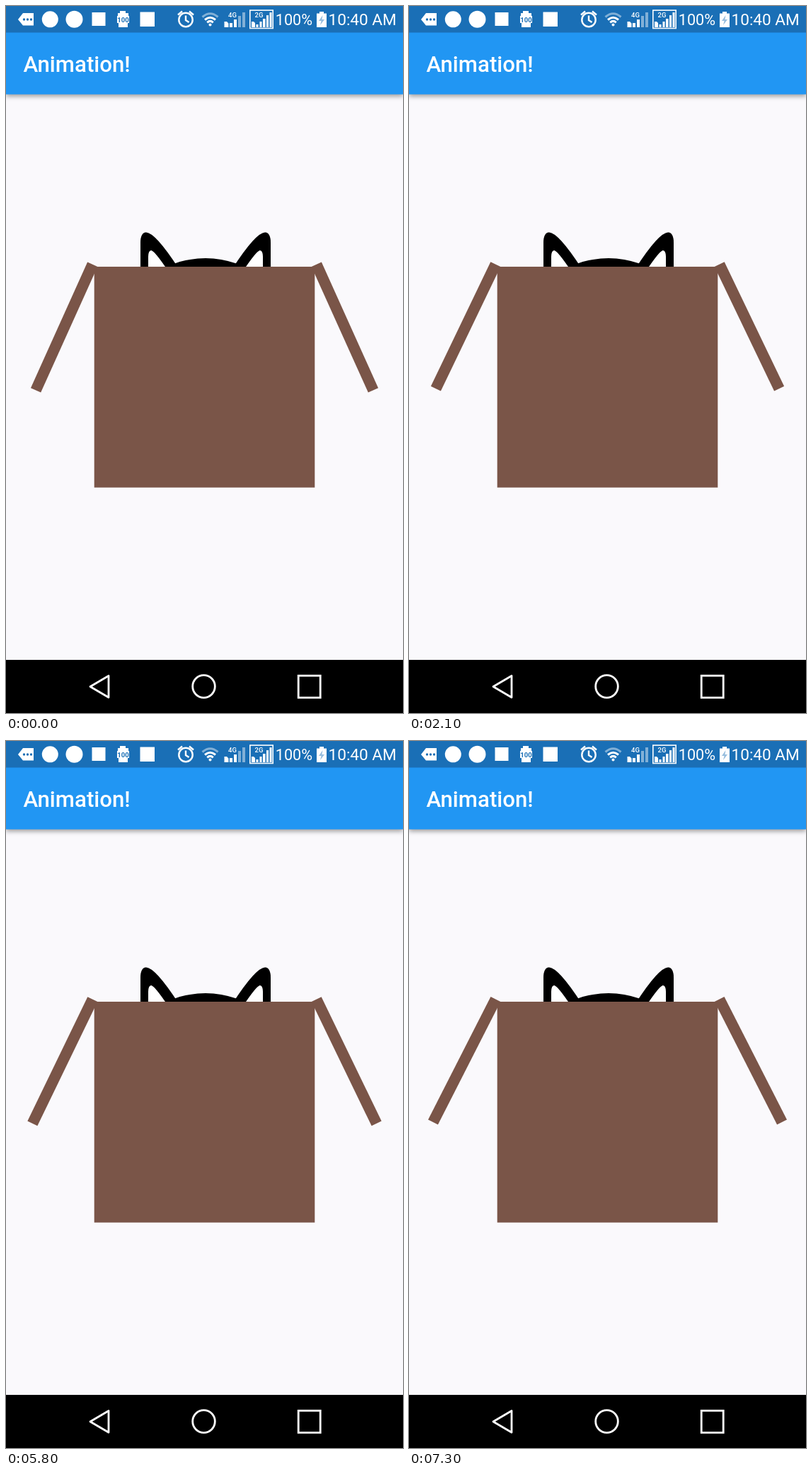
Recreate the animation shown at these times as an HTML page. Size 561 px wide and 998 px high, loop 7400 ms.

```html
<!DOCTYPE html>
<html lang="en">
<head>
<meta charset="utf-8">
<title>Animation!</title>
<style>
  html, body { margin: 0; width: 100%; height: 100%; overflow: hidden; background: #faf9fc; }
  svg { display: block; width: 100%; height: 100%; }
  text { font-family: Roboto, "Noto Sans", sans-serif; fill: #fff; }
  .bar { fill: #2196f3; filter: drop-shadow(0 3px 3px rgba(0, 0, 0, .36)); }
  .wood { fill: #7a5548; }
  .dim { opacity: .45; }
  .line { fill: none; stroke: #fff; }
  .blue { fill: #1a6fb6; }
</style>
</head>
<body>
<svg viewBox="0 0 561 998" preserveAspectRatio="none">
  <defs>
    <g id="side">
      <path d="M190 326V264Q190 250 198 249.5Q211 250 243 299L230 326Z"/>
      <path d="M201 322V284Q201 275 205.5 275Q211 277 229 304V322Z" fill="#fff"/>
      <path d="M147 332L178 344M136 348L176 352.5M140 366L172 362"
        stroke="#000" stroke-width="5" stroke-linecap="round"/>
    </g>
    <rect id="flap" class="wood" width="194.8" height="15.58"/>
  </defs>

  <rect width="561" height="998" fill="#faf9fc"/>

  <g id="cat">
    <use href="#side"/>
    <use href="#side" transform="translate(564) scale(-1 1)"/>
    <ellipse cx="282" cy="384" rx="114" ry="98"/>
    <g fill="#fff">
      <circle cx="245.5" cy="342.3" r="24.7"/>
      <circle cx="317.5" cy="342.3" r="24.7"/>
      <rect x="270" y="361" width="23" height="11" rx="5.5"/>
    </g>
    <circle cx="249.5" cy="348" r="10"/>
    <circle cx="314" cy="348" r="10"/>
    <circle cx="249.5" cy="343.5" r="3" fill="#fff"/>
    <circle cx="313" cy="343.5" r="3" fill="#fff"/>
  </g>

  <rect class="wood" x="124.7" y="368" width="311.6" height="311.7"/>
  <g transform="translate(129.34 368)"><use href="#flap" class="flap"/></g>
  <g transform="translate(431.66 368) scale(-1 1)"><use href="#flap" class="flap"/></g>

  <rect class="bar" y="30" width="561" height="94.7"/>
  <text x="24.5" y="93" font-size="31.2" font-weight="500">Animation!</text>

  <rect class="blue" width="561" height="37.5"/>
  <g fill="#fff">
    <path d="M17 19L24 10H39V27.5H24Z"/>
    <g class="blue">
      <circle cx="25.5" cy="19" r="1.7"/><circle cx="30.5" cy="19" r="1.7"/><circle cx="35.5" cy="19" r="1.7"/>
    </g>
    <circle cx="62.3" cy="18.8" r="11.5"/>
    <circle cx="96.5" cy="18.8" r="12"/>
    <rect x="121.5" y="9" width="19" height="19"/>
    <path d="M161 7H169V10H173V14H174V24H172V30H159V24H157V14H158V10H161Z"/>
    <text x="157.3" y="23" font-size="9.5" font-weight="700" style="fill:#1a6fb6">100</text>
    <rect x="189.5" y="8.5" width="20.5" height="20.5"/>

    <g class="line" stroke-width="2.4">
      <circle cx="254" cy="19.5" r="9.7"/>
      <path d="M254 13.5V20L258.5 23M243 12.5L249 7.5M265 12.5L259 7.5"/>
    </g>

    <g class="line" stroke-width="3">
      <path class="dim" d="M277.5 15.5Q288.5 6 299.5 15.5"/>
      <path d="M281 19.5Q288.5 13 296 19.5M284.3 23.3Q288.5 19.5 292.7 23.3"/>
    </g>
    <circle cx="288.5" cy="26.5" r="2"/>

    <text x="314" y="16" font-size="9.5" font-weight="500">4G</text>
    <path d="M308.5 22H312L314.5 24.5V30H308.5ZM316 24H320V30H316ZM322 19H326V30H322Z"/>
    <path class="dim" d="M328 14H332V30H328ZM334 9H338V30H334Z"/>

    <rect class="line" x="344.8" y="6" width="32.4" height="25.5" stroke-width="1.6"/>
    <text x="351.5" y="16" font-size="9.5" font-weight="500">2G</text>
    <path d="M347 22H350L352 24V30H347ZM353.5 26H356.5V30H353.5ZM358.5 22H361.5V30H358.5ZM363 18H366.5V30H363ZM368 13H371V30H368ZM372.5 9H375.5V30H372.5Z"/>

    <text x="380.8" y="27" font-size="21.6">100%</text>
    <path d="M443 8H449V10.5H453V30H439V10.5H443Z"/>
    <path class="blue dim" d="M447.5 13L442 21H445.5L444 27L450 19H446.5Z"/>
    <text x="455.5" y="27" font-size="22.6">10:40 AM</text>
  </g>

  <rect y="923" width="561" height="75"/>
  <g class="line" stroke-width="2.8">
    <path d="M119 960.7L145 945.5V976Z" stroke-linejoin="round"/>
    <circle cx="279.5" cy="960.5" r="15.8"/>
    <rect x="413.2" y="945.3" width="31" height="31"/>
  </g>
</svg>
<script>
  const LOOP = 7400, FRAME = 100, DROP = 70;
  // Flap swing (0 to 1) and cat height (0 hidden, 1 out) as [ms, value]
  const SWING = [
    [0, .62], [280, 1], [700, .435], [1040, 0], [1400, .415], [1600, .65], [1881, 1],
    [2165, .655], [5363, .655], [5400, .70], [5610, 1], [6100, .36], [6390, 0],
    [6900, .57], [7300, 1]
  ];
  const RISE = [[0, 0], [2165, 0], [2500, 1], [5341, 1], [5691, 0]];

  const cat = document.getElementById('cat');
  const flaps = document.querySelectorAll('.flap');

  function track(points, t) {
    const i = points.findIndex(p => p[0] > t);
    if (i < 0) return points[points.length - 1][1];
    const [t0, a] = points[i - 1], [t1, b] = points[i];
    return a + (b - a) * (t - t0) / (t1 - t0);
  }

  // Cubic Bezier easing, solved by bisection
  function ease(x1, x2, x) {
    let lo = 0, hi = 1, s = .5;
    for (let i = 0; i < 24; i++) {
      s = (lo + hi) / 2;
      const q = 1 - s;
      if (3 * s * q * q * x1 + 3 * s * s * q * x2 + s * s * s < x) lo = s;
      else hi = s;
    }
    return s * s * (3 - 2 * s);
  }

  function draw(now) {
    const t = Math.floor((now % LOOP) / FRAME) * FRAME;
    const angle = 108 + 9 * ease(.42, .58, track(SWING, t));
    const down = DROP * (1 - ease(.42, 1, track(RISE, t)));
    flaps.forEach(f => f.setAttribute('transform', `rotate(${angle})`));
    cat.setAttribute('transform', `translate(0 ${down})`);
  }

  const start = performance.now();
  function tick() {
    draw(performance.now() - start);
    requestAnimationFrame(tick);
  }
  tick();
</script>
</body>
</html>
```
